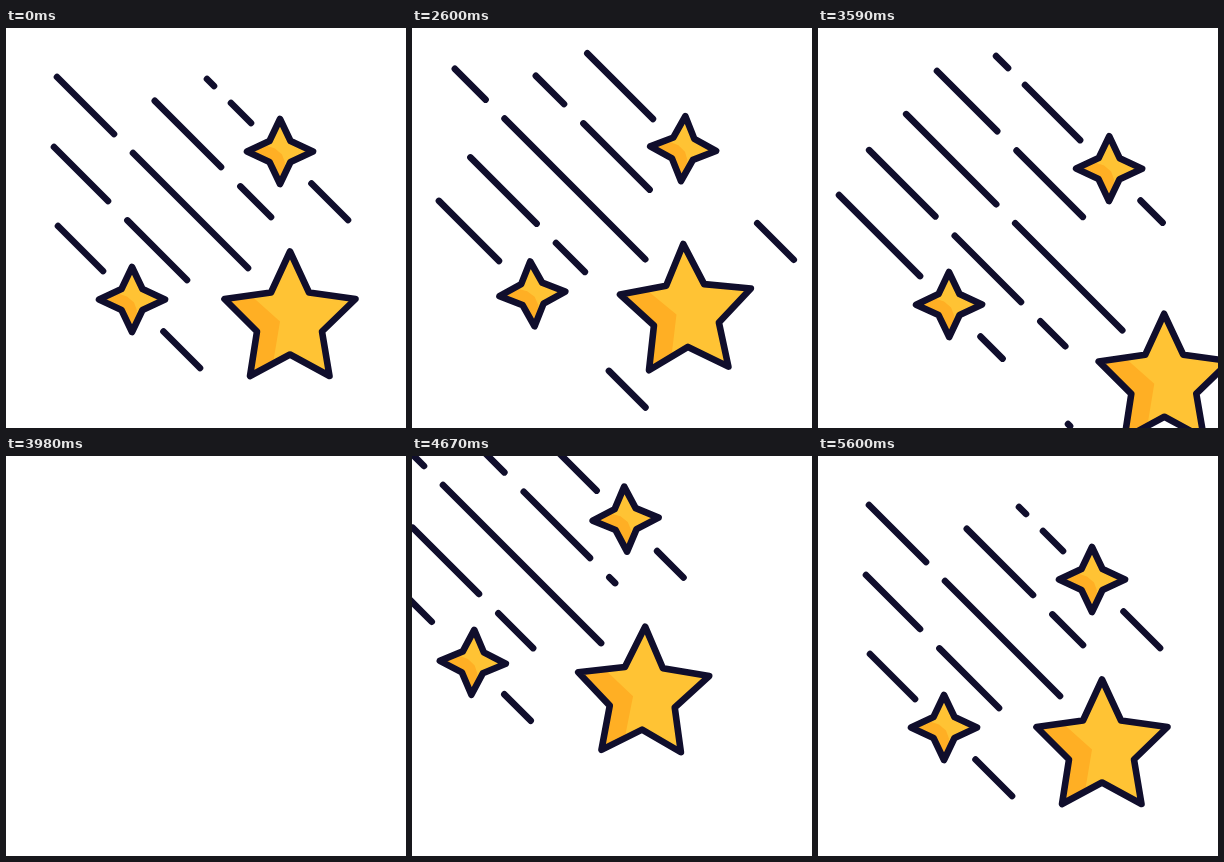
These frames come from a looping animation (400 px wide and 400 px high, 5.63 s). An HTML page with a canvas:

```html
<!DOCTYPE html>
<html lang="en">
<head>
<meta charset="utf-8">
<title>Shooting stars</title>
<style>
html, body { margin: 0; width: 100%; height: 100%; overflow: hidden; background: #fff; }
canvas { display: block; width: 400px; height: 400px; }
</style>
</head>
<body>
<canvas id="stage" width="400" height="400"></canvas>
<script>
const LOOP = 5630, START = 2030, WRAP = 4000;
const INK = '#100e2c', GOLD = '#ffc334', SHADE = '#ffaf24';
const canvas = document.getElementById('stage');
const ctx = canvas.getContext('2d');
const ratio = Math.max(1, window.devicePixelRatio || 1);
canvas.width = canvas.height = 400 * ratio;

// Smooth curve through [time, value] points, flat at both ends.
function curve(...pts) {
  const step = pts.slice(1).map((p, i) => (p[1] - pts[i][1]) / (p[0] - pts[i][0]));
  const slope = pts.map((_, i) => {
    const a = step[i - 1], b = step[i];
    return a * b > 0 ? 2 * a * b / (a + b) : 0;
  });
  return t => {
    if (t <= pts[0][0]) return pts[0][1];
    for (let i = 1; i < pts.length; i++) {
      const [t1, v1] = pts[i];
      if (t > t1) continue;
      const [t0, v0] = pts[i - 1], h = t1 - t0, u = (t - t0) / h, q = 1 - u;
      return v0 * q * q * (1 + 2 * u) + v1 * u * u * (3 - 2 * u)
        + h * u * q * (slope[i - 1] * q - slope[i] * u);
    }
    return pts[pts.length - 1][1];
  };
}

// Pull back, then shoot out of the stage.
const exit = (back, at3590, at3800, last) =>
  curve([2000, 0], [2570, back * 0.6], [3150, back], [3590, at3590], [3800, at3800], [4060, last]);
// Come in from the top left and settle.
const enter = (at4340, at4670) =>
  curve([3780, -500], [4340, at4340], [4670, at4670], [4850, at4670 * 0.76],
    [5150, at4670 * 0.29], [5300, at4670 * 0.13], [5450, -2], [5600, 0]);
const flow = (a, b, c, d, ...rest) =>
  curve([2000, 0], [3140, a], [3590, b], [4340, c], [4670, d], ...rest);

const flowBig = flow(-78, -206, -230, -257, [5610, -428]);
const flowMid = flow(-142, -222, -285, -403, [5610, -513.6]);
const flowSmall = flow(-112, -142, -200, -269, [5610, -321]);
const flowFront = flow(-147, -218.5, -222, -316, [5150, -356], [5300, -376], [5450, -400], [5610, -408]);

// d: x - y of the diagonal; tail, head: its ends in y; gap: where a gap begins at rest.
const tracks = [
  { d: 2, tail: 49, head: 240, gap: 106, space: 19, period: 214, flow: flowBig,
    headOut: exit(-14, 62, 200, 620), tailOut: exit(-13, 37, 150, 560), in: enter(-121, -53), star: 'big' },
  { d: 76, tail: 56, head: 189, gap: 139, space: 19.4, period: 85.6, flow: flowMid,
    headOut: exit(-13, 15, 150, 600), tailOut: exit(-13, -13, 90, 560), in: enter(-147, -62) },
  { d: -71, tail: 119, head: 252, gap: 173, space: 19.4, period: 85.6, flow: flowMid,
    headOut: exit(-13, 66, 190, 600), tailOut: exit(-13, 0, 100, 560), in: enter(-144, -60) },
  { d: 150, tail: 51, head: 95, gap: 58, space: 17, period: 107, flow: flowSmall,
    headOut: exit(-6.5, 17, 130, 560), tailOut: exit(-41, -23, 80, 520), in: enter(-144, -60.5),
    star: 'small', y: 123.5, sway: 1 },
  { d: -146, tail: 198, head: 243, gap: 179, space: 17, period: 107, flow: flowSmall,
    headOut: exit(-7, 5, 105, 560), tailOut: exit(-40, -31, 70, 520), in: enter(-149.5, -65.3),
    star: 'small', y: 271.5, sway: -1 }
];

const shapes = {
  big: {
    body: [[0, -68], [19, -27], [65.5, -20.5], [32, 12], [39.5, 56.5], [0, 35], [-40, 56.5],
      [-33, 12], [-65.5, -20.5], [-19, -27]],
    shade: [[-65.5, -20.5], [-39, -24], [-10, 2], [-17, 44], [-40, 56.5], [-33, 12]]
  },
  small: {
    body: [[0, -32.5], [10.5, -10.5], [33, 0], [10.5, 10.5], [0, 32.5], [-10.5, 10.5], [-33, 0], [-10.5, -10.5]],
    shade: [[-33, 0], [-14, -6], [-5, -3], [2, 3], [5, 11], [4, 22], [0, 32.5], [-10.5, 10.5]]
  }
};

function polygon(pts) {
  ctx.beginPath();
  pts.forEach(p => ctx.lineTo(p[0], p[1]));
  ctx.closePath();
}

function drawStar(name, x, y, degrees) {
  const { body, shade } = shapes[name];
  ctx.save();
  ctx.translate(x, y);
  ctx.rotate(degrees * Math.PI / 180);
  polygon(body);
  ctx.fillStyle = GOLD;
  ctx.fill();
  polygon(shade);
  ctx.fillStyle = SHADE;
  ctx.fill();
  polygon(body);
  ctx.stroke();
  ctx.restore();
}

// Dashes on a diagonal, cut off at the ends of the visible stretch.
function drawDashes(d, from, to, gap, space, period) {
  let y = gap + Math.floor((from - gap) / period) * period;
  ctx.beginPath();
  for (; y < to; y += period) {
    const a = Math.max(from, y + space), b = Math.min(to, y + period);
    if (b <= a) continue;
    ctx.moveTo(a + d, a);
    ctx.lineTo(b + d, b);
  }
  ctx.stroke();
}

function draw(time) {
  const t = time < START ? 2000 : time;
  const fade = t < START ? 0 : Math.max(0, Math.min(1, (5500 - t) / 400));
  const wave = fade * Math.sin(2 * Math.PI * ((t - 2000) / 112.5 - 0.1333));
  const shake = wave * Math.max(0, 1 - (t - 2000) / 1000);

  ctx.setTransform(ratio, 0, 0, ratio, 0, 0);
  ctx.fillStyle = '#fff';
  ctx.fillRect(0, 0, 400, 400);
  ctx.strokeStyle = INK;
  ctx.lineWidth = 6.6;
  ctx.lineCap = ctx.lineJoin = 'round';

  for (const k of tracks) {
    const out = t < WRAP;
    const head = out ? k.headOut(t) : k.in(t);
    const tail = out ? k.tailOut(t) : head;
    drawDashes(k.d, k.tail + tail, k.head + head, k.gap + k.flow(t) + head, k.space, k.period);
    if (k.star === 'small') {
      const y = k.y + head, s = 3.2 * shake * k.sway;
      drawDashes(k.d, y + 32, y + 121.5, y + 68.5 + flowFront(t), 65.5, 102);
      drawStar('small', y + k.d + 0.5 + s, y + s, 4 * wave * k.sway);
    } else if (k.star) {
      drawStar('big', 284 + head - 2.2 * shake, 291.5 + head + 3.2 * shake, -2.7 * wave);
    }
  }
}

const begin = performance.now();
function tick() {
  draw((performance.now() - begin) % LOOP);
  requestAnimationFrame(tick);
}
tick();
</script>
</body>
</html>
```
